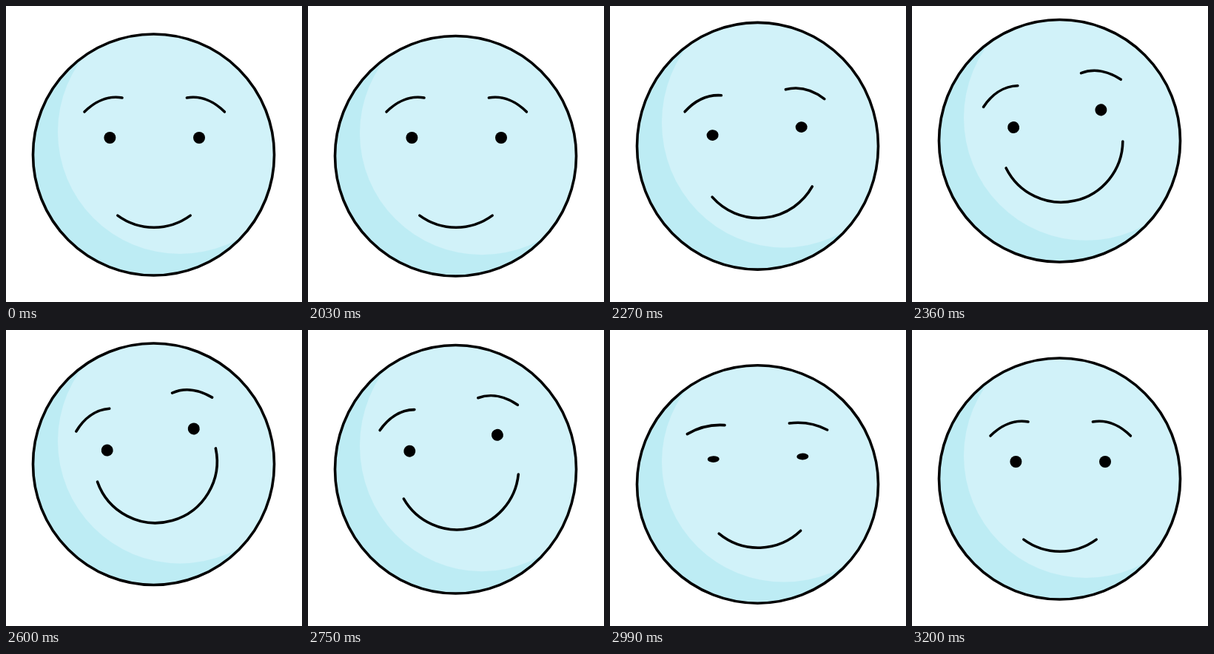
Write an HTML page that moves like this. It is 400x400 px and loops after 3830 ms.

```html
<!DOCTYPE html>
<html lang="en">
<head>
<meta charset="utf-8">
<title>Smiling face</title>
<style>
  html, body { margin: 0; width: 100%; height: 100%; overflow: hidden; background: #fff; }
  svg { display: block; width: 100vw; height: 100vh; }
  .line { fill: none; stroke: #000; stroke-width: 3.6; stroke-linecap: round; }
</style>
</head>
<body>
<svg viewBox="0 0 400 400">
  <defs>
    <clipPath id="disc"><circle r="163"/></clipPath>
  </defs>
  <g id="body">
    <circle r="163" fill="#bdecf4"/>
    <g clip-path="url(#disc)"><circle cx="35.5" cy="-31" r="165" fill="#d1f2f9"/></g>
    <circle class="line" r="163" vector-effect="non-scaling-stroke"/>
  </g>
  <g id="look">
    <path id="browL" class="line"/>
    <path id="browR" class="line"/>
    <ellipse id="eyeL" cx="-60.3" rx="8"/>
    <ellipse id="eyeR" cx="60.3" rx="8"/>
  </g>
  <path id="mouth" class="line"/>
</svg>
<script>
const LOOP = 3830, START = 2000, STEP = 30, LAST = 40;
const MOUTH_R = 83.2;

// Each track is a list of [step, value] keys.
const tracks = {
  top: [[0, 38], [1, 40.5], [3.5, 52], [6, 31], [12, 18.5], [20, 18], [28, 24], [32, 50], [36, 36], [40, 38]],
  bottom: [[0, 364], [1, 365], [4, 372], [6, 369], [12, 346], [20, 344.5], [28, 365.5], [31, 372], [36, 364], [40, 364]],
  turn: [[0, 0], [6, 0], [12, 11.3], [20, 14], [28, 7.3], [36, 0]],
  eyeY: [[1, 0], [6, 6.5], [12, -25.8], [20, -30], [28, -20.2], [36, 0]],
  mouthY: [[1, 0], [6, 7], [12, -34], [20, -38.5], [28, -21], [36, 0]],
  smileL: [[0, 36.2], [6, 36.2], [12, 63.6], [20, 70.6], [28, 51.6], [36, 36.2]],
  smileR: [[0, 36.2], [6, 36.2], [12, 89.3], [20, 102.2], [28, 68.8], [36, 36.2]],
  open: [[1, 1], [5, 0.1], [6, 0.28], [10, 1], [25, 1], [28, 0.75], [31, 0.1], [35, 1]]
};

const $ = id => document.getElementById(id);
const set = (id, attrs) => {
  const el = $(id);
  for (const k in attrs) el.setAttribute(k, attrs[k]);
};

const slope = (a, b) => (b[1] - a[1]) / (b[0] - a[0]);

// Flat at turning points and at both ends, smooth in between.
function tangent(keys, i) {
  if (i === 0 || i === keys.length - 1) return 0;
  const a = slope(keys[i - 1], keys[i]), b = slope(keys[i], keys[i + 1]);
  return a * b > 0 ? 2 * a * b / (a + b) : 0;
}

function sample(keys, n) {
  const end = keys.length - 1;
  if (n <= keys[0][0]) return keys[0][1];
  if (n >= keys[end][0]) return keys[end][1];
  let i = 0;
  while (n > keys[i + 1][0]) i++;
  const [x0, y0] = keys[i], [x1, y1] = keys[i + 1];
  const w = x1 - x0, u = (n - x0) / w, v = 1 - u;
  return y0 * v * v * (1 + 2 * u) + y1 * u * u * (3 - 2 * u)
    + w * u * v * (tangent(keys, i) * v - tangent(keys, i + 1) * u);
}

function brow(side, open) {
  const p = (x, y) => `${side * x} ${-35 - y * open}`;
  return `M${p(94.7, 0)}C${p(81.7, 13)} ${p(63.7, 22.5)} ${p(43.7, 19)}`;
}

function smile(x, y, left, right) {
  const end = (deg, side) => {
    const a = deg * Math.PI / 180;
    return `${x + side * MOUTH_R * Math.sin(a)} ${y + MOUTH_R * Math.cos(a)}`;
  };
  const large = left + right > 180 ? 1 : 0;
  return `M${end(left, -1)}A${MOUTH_R} ${MOUTH_R} 0 ${large} 0 ${end(right, 1)}`;
}

function draw(ms) {
  const n = Math.max(0, Math.min(LAST, Math.floor((ms % LOOP - START) / STEP)));
  const s = {};
  for (const k in tracks) s[k] = sample(tracks[k], n);
  const tilt = s.turn / 14;

  set('body', {
    transform: `translate(199.5 ${(s.top + s.bottom) / 2}) scale(1 ${(s.bottom - s.top) / 326})`
  });
  set('look', {
    transform: `translate(${200.7 - 5.5 * tilt} ${178 + s.eyeY}) rotate(${-s.turn})`
  });
  set('browL', { d: brow(-1, s.open) });
  set('browR', { d: brow(1, s.open) });
  set('eyeL', { ry: 8 * s.open });
  set('eyeR', { ry: 8 * s.open });
  set('mouth', { d: smile(200 + 2 * tilt, 216 + s.mouthY, s.smileL, s.smileR) });
}

function tick(now) {
  draw(now);
  requestAnimationFrame(tick);
}
draw(0);
requestAnimationFrame(tick);
</script>
</body>
</html>
```
